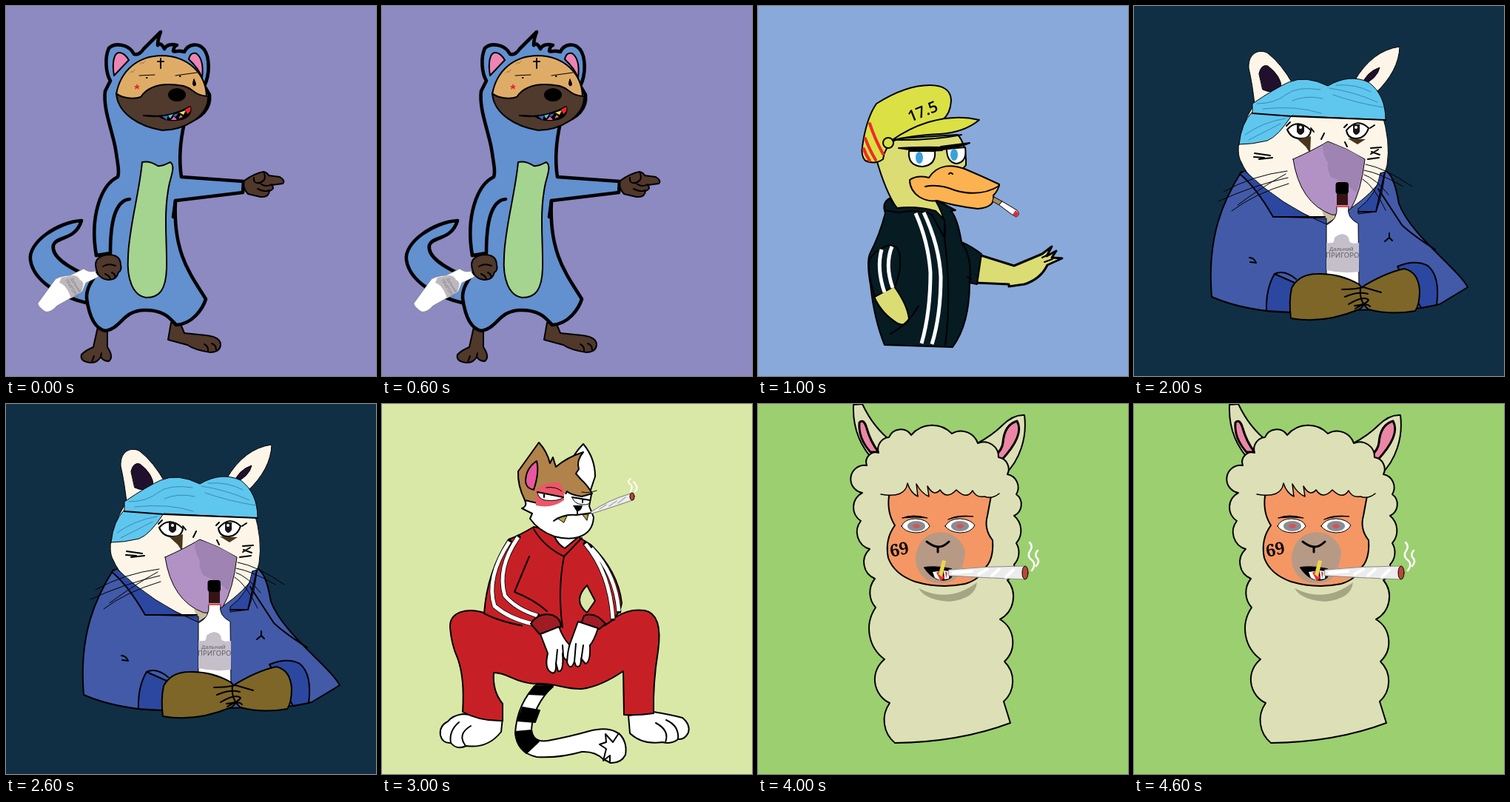
Write an HTML page that moves like this. It is 500 by 500 pixels and loops after 5 s.

```html
<!DOCTYPE html>
<html lang="en">
<head>
<meta charset="utf-8">
<title>Animal portraits</title>
<style>
html, body { margin: 0; width: 100%; height: 100%; overflow: hidden; }
svg { display: block; width: 100vw; height: 100vh; }
svg > g { visibility: hidden; stroke: #000; stroke-width: 2; stroke-linejoin: round; stroke-linecap: round; }
svg > g.on { visibility: visible; }
text { stroke: none; }
.n { stroke: none; }
.l { fill: none; }
.t { stroke-width: 1; }
.b { stroke-width: 4.6; }
.w { fill: none; stroke: #fff; stroke-width: 5; stroke-linecap: butt; }
</style>
</head>
<body>
<svg viewBox="0 0 500 500">

<!-- Weasel -->
<g>
  <path class="n" fill="#8d89c1" d="M0 0H500V500H0Z"/>
  <path class="b" fill="#6390cf" d="M102 290C70 292 30 319 33 343C37 372 73 393 112 402L118 368C80 352 61 338 64 323C68 311 94 317 102 290Z"/>
  <g fill="#50382b">
    <path d="M124 434L137 439V461Q146 474 139 480Q131 480 128 474Q122 485 109 481Q100 479 102 471Q108 465 118 461Z"/>
    <path d="M223 428L236 430L241 442L270 445Q290 447 290 458Q289 468 276 468Q255 465 245 458L219 451Z"/>
    <path class="l" d="M116 481L119 473M128 474L129 469M273 467Q274 460 268 457M284 465Q284 458 278 456"/>
  </g>
  <path class="b" fill="#6390cf" d="M148 193C152 218 153 225 151 231C128 242 113 285 122 337L138 336C128 362 108 372 109 395C113 424 122 437 135 439C156 435 158 411 188 411C215 411 222 423 230 431C252 430 266 409 270 396C251 365 225 335 229 263L320 252L321 237L237 231C233 205 236 180 241 158C265 152 277 138 275 120L268 108C276 92 275 69 268 59C260 49 246 51 241 62C232 59 227 63 226 61Q227 54 231 53Q218 50 214 58Q209 48 205 53Q205 45 209 35L186 58Q180 67 173 65C165 50 146 50 139 57C133 70 135 91 141 101L134 115C131 139 143 166 148 193Z"/>
  <path class="l b" d="M122 337L141 334C141 296 146 263 167 261M229 263L226 285"/>
  <path fill="#ec84b4" d="M146 94C143 76 146 63 153 63Q160 63 166 73ZM247 72Q249 62 257 64Q268 72 265 97Q260 84 247 72Z"/>
  <path fill="#dfac68" d="M149 119C155 86 179 68 209 67C247 67 270 92 271 122L211 150Z"/>
  <path fill="#4f3a2d" d="M149 118C156 125 173 126 182 123C196 102 224 105 240 108C255 112 253 121 273 122C274 151 238 168 211 168C181 163 151 146 149 118Z"/>
  <ellipse cx="231" cy="120" rx="11" ry="8"/>
  <path d="M186 148Q218 153 249 136Q252 148 238 153Q218 157 207 149Z"/>
  <path class="n" fill="#3b64b9" d="M211 149L219 148L217 154ZM226 147L233 145L229 150Z"/>
  <path class="n" fill="#d66baa" d="M223 154L227 149L231 154ZM233 152L236 147L239 150Z"/>
  <path class="n" fill="#62c5dc" d="M219 148L226 146L222 152Z"/>
  <path class="n" fill="#e6df54" d="M234 144L243 141L240 147Z"/>
  <path class="n" fill="#ee2330" d="M242 140L249 136Q251 142 245 146Z"/>
  <path class="l t" d="M180 94L201 93M229 94L258 90"/>
  <path class="l" d="M209 71V84M205 75H213M190 97h.5M235 95h.5"/>
  <path class="t" d="M254 99Q251 106 254 108Q259 108 254 99Z"/>
  <path class="n" fill="#e42932" d="M177 105L178.500 108H181L179 110L180 113L177 111L174 113L175 110L173 108H176Z"/>
  <path class="l" stroke="#a87944" stroke-width="1" d="M167 91L170 88L171 90L174 86M181 79L183 76L185 78L188 74"/>
  <path fill="#a5d490" d="M184 211C194 209 202 214 205 216C212 217 218 213 222 211C228 215 225 225 221 239C212 280 218 318 217 355C216 384 207 394 190 394C171 392 163 368 165 339C166 300 180 254 184 211Z"/>
  <g class="t">
    <path fill="#fff" stroke-width=".6" stroke="#777" d="M67 369Q73 365 87 364L105 355Q113 361 120 358L125 366L108 374L103 386L69 405Q60 415 53 413Q43 406 43 402Z"/>
    <path class="n" fill="#bdb8be" d="M75 367L91 364Q97 364 100 370Q106 373 104 379L102 386L88 395Q82 377 72 374Z"/>
    <g fill="#77727a" font-family="'Noto Sans',sans-serif" transform="translate(86 367) rotate(58)">
      <text font-size="5" x="2" y="0">Дальний</text>
      <text font-size="5.500" x="0" y="7">ПРИГОРОК</text>
    </g>
  </g>
  <g fill="#50382b">
    <path d="M121 350Q121 338 138 336Q155 336 155 350Q157 357 152 360Q149 371 138 370Q123 369 121 350Z"/>
    <path class="l" d="M131 352Q138 347 148 351M134 362Q140 365 141 369M143 360Q149 363 147 368"/>
    <path d="M322 236Q336 226 348 224Q353 225 355 229L370 231Q378 236 374 240L359 242Q364 247 356 250Q355 259 344 258L327 254Q319 246 322 236Z"/>
    <path class="l" d="M349 226Q352 235 345 238Q334 242 335 232M343 239Q350 246 359 241M340 247Q350 252 356 249"/>
  </g>
</g>

<!-- Duck -->
<g>
  <path class="n" fill="#89a9da" d="M0 0H500V500H0Z"/>
  <path fill="#dbdc74" stroke-width="3" d="M298 336L346 351L384 335L397 325L390 338L403 331L397 340L411 341L391 350Q382 369 360 376L339 379V376L294 374Z"/>
  <path class="l" d="M384 340L394 335M387 346L398 342"/>
  <path fill="#061b22" d="M178 260Q167 266 172 280Q164 310 152 333Q146 343 152 377Q157 424 171 458L263 461C282 435 286 400 286 374L296 376L302 335Q287 324 275 319Q270 288 261 277L267 276L240 262Z"/>
  <path class="l" d="M275 319Q290 340 286 374M252 313Q262 392 253 458M283 366L288 369"/>
  <path fill="#dbdc74" d="M160 207Q172 250 188 274Q216 274 234 280L252 313Q257 293 240 263L281 215Q282 188 270 174L175 180Z"/>
  <path fill="#061b22" d="M178 260Q169 264 171 276L190 279Q220 274 235 282L252 313L252 289L240 277Q215 270 188 273Z"/>
  <path class="w" stroke-width="6" d="M213 280Q230 318 233 360Q233 414 221 456M224 279Q245 324 247 366Q247 418 235 457"/>
  <path fill="#dbdc74" d="M157 393L184 379Q202 404 204 423Q199 434 189 429Q167 416 157 393Z"/>
  <path fill="#061b22" d="M158 333Q185 314 191 333Q195 354 186 377L158 393Q147 360 151 342Z"/>
  <path class="w" d="M167 329Q160 355 171 387M181 325Q171 350 182 381"/>
  <path class="l" d="M217 405Q203 430 179 443"/>
  <path fill="#fff" d="M204 196H239Q241 215 222 217Q202 216 204 196Z"/>
  <path fill="#fff" d="M255 193L280 191Q283 211 268 213Q255 211 255 193Z"/>
  <g class="n" fill="#3aa1dc"><ellipse cx="218" cy="205" rx="5" ry="8"/><ellipse cx="265" cy="201" rx="5" ry="8"/></g>
  <path d="M190 192Q220 190 250 191L249 195Q220 197 190 192ZM247 190Q270 187 286 185Q270 192 248 194Z"/>
  <path class="l" d="M180 181Q235 182 275 174"/>
  <path fill="#fcb250" d="M205 235Q215 228 231 232C243 213 263 214 279 220Q305 231 326 241Q325 249 318 256Q321 272 297 274Q264 270 242 263Q230 265 218 258Q205 249 205 235Z"/>
  <path class="l" d="M226 244Q244 240 266 249Q300 259 326 243M258 227Q260 224 263 227"/>
  <path class="t" fill="#a68c62" d="M319 258L330 264L326 269L317 264Z"/>
  <path class="t" fill="#fff" d="M330 264L350 276Q355 282 349 285L342 281L326 269Z"/>
  <path class="n" fill="#e22b35" d="M348 276Q355 282 350 285L344 282Z"/>
  <path fill="#dbe045" d="M141 190C145 161 151 145 160 132C190 113 213 107 232 107C253 107 261 116 261 128Q260 146 249 154L184 182Q170 193 169 207Q158 215 145 209Q139 203 141 190Z"/>
  <path class="l" stroke="#ed2b2d" stroke-width="4" d="M151 159Q158 180 169 200M145 179Q151 195 159 208M143 193Q146 202 151 209"/>
  <path fill="#dbe045" d="M180 182Q204 165 230 157Q267 146 299 154Q278 171 246 173Q205 175 180 182Z"/>
  <circle cx="176" cy="185" r="7" fill="#dbe045"/>
  <text font-family="'Open Sans',sans-serif" font-size="21" font-weight="600" transform="translate(206 157) rotate(-22)">17.5</text>
</g>

<!-- Masked cat -->
<g>
  <path class="n" fill="#112f44" d="M0 0H500V500H0Z"/>
  <path fill="#425aa8" d="M145 224C122 261 98 310 105 393Q151 413 213 414L388 408L413 403L451 380C437 354 374 310 358 267Q351 225 338 222Z"/>
  <g fill="#fdf6e8" class="t">
    <path d="M163 133Q160 105 155 84C154 61 172 58 181 64Q199 78 215 106L200 145ZM298 101Q322 60 359 55Q358 88 326 118Z"/>
    <path d="M165 130C145 157 135 195 145 211C159 245 207 273 260 294Q336 251 342 215Q347 183 335 145Z"/>
  </g>
  <path fill="#21102d" class="t" d="M169 91Q172 78 181 81Q199 95 199 110Q188 120 174 113ZM307 108Q314 89 332 83Q329 98 307 108Z"/>
  <path fill="#5fc6ee" class="t" d="M142 187Q145 158 160 143V132Q191 111 209 103Q232 93 262 108Q291 91 317 103Q340 120 340 154L213 148Q195 176 180 182Q160 187 142 187Z"/>
  <path class="l" d="M160 145L213 149L340 154"/>
  <path class="l" stroke="#347aa0" stroke-width=".8" d="M166 132Q190 132 205 120T252 113M174 139Q220 134 253 145M264 111Q298 116 329 130M269 120Q300 131 337 137M273 107Q300 105 320 116M214 128Q232 120 255 125M150 174Q174 157 204 152M155 181Q179 169 198 159"/>
  <path class="n" fill="#c7bd9d" d="M254 277L275 283L260 294Z"/>
  <path fill="#2c47a0" class="t" d="M143 227L150 223Q199 270 260 295V287L188 285Q166 247 143 227ZM333 226L339 224Q337 253 327 278L303 281V274Q328 256 333 226Z"/>
  <path class="l" d="M143 227Q165 245 188 285H258M339 225L327 278H303M156 340Q162 340 165 347M157 346L165 347M345 307V313L339 318M345 313L349 317M330 247L362 296Q377 310 407 329"/>
  <g fill="#fff">
    <path d="M207 167Q221 151 239 168Q238 180 224 179Q212 179 207 167ZM287 168Q302 150 317 165Q313 178 301 179Q289 180 287 168Z"/>
    <path class="n" fill="#171316" d="M220 160h10v10q-5 8-10 0ZM296 160h9v10q-5 8-9 0Z"/>
    <circle class="n" cx="225" cy="164" r="2"/><circle class="n" cx="300" cy="164" r="2"/>
  </g>
  <path class="n" fill="#4a351c" d="M221 180L239 176L238 199L232 190ZM289 179L313 180L302 187Z"/>
  <path class="l" d="M206 162L211 157M239 165L243 170M284 164L288 160M319 165L325 161M163 199L184 202M169 207L187 205M162 204L176 205M320 192L334 191M321 197L332 201M316 207L331 205M320 200L330 194M253 180L257 172M285 184L288 190"/>
  <g class="t">
    <path fill="#b291c4" d="M215 207Q242 195 262 183Q288 192 312 207Q307 251 293 274Q278 284 267 282Q224 266 215 207Z"/>
    <path class="n" fill="#9f83b2" d="M262 184Q289 192 311 207Q307 236 300 252Q286 239 266 231Q260 218 262 212Q254 198 255 187Z"/>
  </g>
  <path class="l t" d="M207 223Q160 229 121 251M208 232Q162 242 114 264M209 240Q162 254 132 277M205 227Q175 243 140 269M313 214Q340 219 376 244M311 222Q333 226 364 244M311 228Q326 233 344 255M309 234Q325 244 340 276"/>
  <path class="t" fill="#fff" d="M274 271H290Q287 286 303 294L304 382L260 378V296Q276 288 274 271Z"/>
  <path class="n" fill="#361415" d="M274 252H289V269H274Z"/>
  <rect class="n" x="272.500" y="238" width="17.500" height="16" rx="4"/>
  <path class="l" stroke="#e34b49" d="M274 271H290"/>
  <path class="n" fill="#c5bfca" d="M260 320Q270 321 270 318Q270 310 281 308Q291 309 291 318Q294 322 304 320V359Q282 362 260 357Z"/>
  <g fill="#605c64" font-family="'Noto Sans',sans-serif">
    <text x="264" y="331" font-size="7.500">Дальний</text>
    <svg x="260" y="330" width="44" height="15"><text x="-1" y="10" font-size="9.500">ПРИГОРОК</text></svg>
  </g>
  <path fill="#2c47a0" d="M190 362Q178 382 179 412L212 414L217 374ZM356 352Q380 342 397 351Q414 365 409 404L388 408Z"/>
  <path class="l" d="M190 362Q203 356 219 369"/>
  <path fill="#7d6628" d="M213 381Q223 362 248 362Q278 361 304 376Q312 384 308 394Q314 405 304 410Q256 430 212 422Q209 400 213 381Z"/>
  <path fill="#7d6628" d="M306 381Q338 361 365 355Q384 359 386 384Q386 404 380 412Q347 418 317 410Q304 400 306 381Z"/>
  <path class="l" d="M281 383Q299 383 310 380L334 387M285 393Q303 385 316 389M290 403Q310 391 317 397Q314 404 298 405M299 409Q314 400 319 406"/>
</g>

<!-- Tracksuit cat -->
<g stroke-width="1.700">
  <path class="n" fill="#d9e8a6" d="M0 0H500V500H0Z"/>
  <path fill="#fff" d="M209 379Q183 404 180 444Q182 471 209 477Q238 479 270 470Q288 469 299 480L307 484Q324 486 328 470Q331 451 316 443Q303 436 280 442Q256 449 224 455Q204 458 202 440Q204 408 231 381Z"/>
  <path d="M206 381L231 382L219 393L198 392ZM190 410L213 414L207 430L183 428ZM180 443L202 441Q202 453 212 456L195 472Q182 462 180 443Z"/>
  <path fill="#fff" d="M299 482L303 466L294 460L303 457L302 446L312 457L320 445Q332 457 329 474Q323 486 308 485V475Z"/>
  <g fill="#fff">
    <path d="M109 419Q95 421 89 429Q77 435 79 448Q82 459 93 458Q101 468 114 462Q143 466 161 443L163 424Z"/>
    <path class="l" d="M93 458Q90 442 104 430M113 462Q101 446 120 435"/>
    <path d="M333 421L367 416Q391 420 406 424Q417 433 414 444Q409 454 400 453Q392 460 379 457Q352 461 335 445Z"/>
    <path class="l" d="M400 453Q402 435 384 427M383 457Q389 441 370 431"/>
  </g>
  <path fill="#c62026" d="M141 283C111 273 91 283 92 302Q94 326 102 343Q112 370 109 416Q132 429 163 428V405Q149 388 151 363C170 363 178 376 205 378C235 376 245 386 270 385Q295 382 326 361L327 420Q346 421 367 418Q366 377 373 334Q380 284 355 279Q334 276 316 288L230 297Z"/>
  <path fill="#c62026" d="M205 166Q185 178 171 183Q142 227 138 283Q160 295 203 302L290 304Q320 293 324 269Q319 226 282 190L261 177Z"/>
  <path class="n" fill="#c62026" d="M190 290H300V325H190Z"/>
  <path fill="#d9e8a6" d="M277 245L288 266L277 282Q257 266 277 245Z"/>
  <path class="l" d="M199 206L179 254Q205 264 223 280M205 169Q219 193 246 206L270 181M246 206Q237 252 244 302"/>
  <g class="l">
    <path id="stripes" stroke-width="6.600" d="M172 186Q140 235 152 273Q172 290 203 297M184 180Q155 222 166 259Q181 277 210 286M275 189Q308 228 312 290M283 195Q316 230 320 280"/>
    <path class="w" d="M172 186Q140 235 152 273Q172 290 203 297M184 180Q155 222 166 259Q181 277 210 286M275 189Q308 228 312 290M283 195Q316 230 320 280"/>
  </g>
  <path fill="#9f1c24" d="M201 297Q211 281 230 285Q242 290 242 301L213 311ZM273 286Q288 280 302 297L294 304L269 297Z"/>
  <g fill="#fff">
    <path d="M214 311L239 301Q245 317 253 325Q257 336 252 345Q246 348 244 337Q246 363 238 361L235 350Q236 366 229 363Q219 358 224 337Z"/>
    <path d="M265 294L292 303Q286 321 281 326Q282 349 275 351L269 344Q269 358 262 354L260 348Q255 362 250 349Q251 333 254 324Z"/>
    <path class="l" d="M237 332L235 352M244 326L245 340M272 326L269 347M262 324L260 348"/>
  </g>
  <path fill="#fff" d="M193 130Q197 138 189 141L203 148L200 155Q211 171 233 179Q238 190 247 195L265 180Q285 174 286 153L280 138L283 122L239 90Z"/>
  <path class="l" d="M233 179Q252 184 265 180"/>
  <path fill="#fff" d="M253 82Q260 66 272 54Q288 73 288 98L281 119L261 101Z"/>
  <path fill="#b1824a" d="M193 130Q183 110 184 91L212 52Q223 64 227 80L231 72L235 85Q250 72 272 65Q262 77 266 88L262 94L269 102Q278 110 284 121L270 125Q255 123 250 118L245 128L210 134Z"/>
  <path fill="#e9579e" d="M194 105Q194 87 209 77Q213 92 205 116Q195 114 194 105Z"/>
  <path class="n" fill="#ec5668" d="M208 117Q218 105 239 106Q249 118 246 130Q229 142 208 137Z"/>
  <path class="n" fill="#fff" d="M246 121L257 125L259 139L243 146L232 140L246 130Z"/>
  <path class="t" fill="#fff" d="M210 119L245 126Q239 132 220 130Q211 128 210 119ZM257 126L281 130Q282 137 271 136Q259 135 257 126Z"/>
  <path class="l" d="M210 119L245 126M257 126L281 130M219 122V126M271 130V133"/>
  <path class="l t" d="M222 113Q235 111 243 118M270 119Q279 121 290 117"/>
  <path class="n" d="M258 137L271 137Q269 146 263 145Z"/>
  <path fill="#b5a13e" class="t" d="M237 154L250 151L246 160ZM271 149H279L277 157Z"/>
  <path class="l" d="M232 158Q245 148 263 150L284 147M264 143V150"/>
  <path fill="#ececec" class="t" stroke="#777" d="M282 146Q305 130 336 121L341 129Q316 138 284 148Z"/>
  <path class="l" stroke="#aaa" stroke-width="1.500" d="M294 142L303 136M307 138L317 131M319 134L329 126"/>
  <ellipse class="t" cx="338" cy="125" rx="3" ry="5" fill="#b84634"/>
  <path class="l" stroke="#fff" d="M336 118Q340 111 334 107Q331 104 336 101M342 118Q347 113 342 108L340 105"/>
</g>

<!-- Llama -->
<g>
  <path class="n" fill="#9bcf6f" d="M0 0H500V500H0Z"/>
  <path fill="#dde0b6" d="M158 78Q127 46 129 1L141 0Q156 32 181 51ZM295 54Q317 42 330 29Q345 14 360 15C364 45 354 76 333 96Z"/>
  <path fill="#ec86a5" stroke-width="3" d="M152 65Q135 46 137 25Q143 19 147 33Q152 51 163 65ZM321 69Q330 62 331 52Q333 28 350 23Q361 42 328 77Z"/>
  <path id="wool" fill="#dde0b6"/>
  <path class="n" fill="#a6a584" d="M217 249Q258 270 296 241Q294 263 259 267Q226 265 217 249Z"/>
  <path fill="#f49765" d="M177 124Q174 147 185 164Q171 183 176 208Q184 230 212 240Q246 250 280 243Q300 237 305 223Q319 212 317 184Q305 169 310 151L315 124L250 104H203Z"/>
  <path class="n" fill="#dde0b6" d="M166 122V95H324V121Q316 129 306 125Q295 127 290 117Q282 130 268 116Q255 130 246 116Q238 126 229 111L231 125Q221 121 214 108L216 125Q206 120 202 107Q199 128 166 122Z"/>
  <path class="l" stroke-width="1.500" d="M166 122Q199 128 202 107Q206 120 216 125L214 108Q221 121 231 125L229 111Q238 126 246 116Q255 130 268 116Q282 130 290 117Q295 127 306 125Q316 129 326 121"/>
  <path class="t" d="M195 154Q209 148 229 154Q211 152 195 154ZM257 156Q269 149 291 152Q271 151 257 156Z" stroke-width="2"/>
  <g class="t">
    <path fill="#fff" d="M194 165Q198 155 213 155Q229 156 232 165Q227 174 213 174Q198 173 194 165ZM253 165Q258 155 273 155Q288 156 293 164Q288 174 273 174Q258 173 253 165Z"/>
    <g class="n" fill="#8b8b91"><ellipse cx="214" cy="165" rx="12" ry="7"/><ellipse cx="273" cy="165" rx="12" ry="7"/></g>
    <g class="n" fill="#ce5759"><ellipse cx="214" cy="165" rx="5" ry="3"/><ellipse cx="273" cy="165" rx="5" ry="3"/></g>
  </g>
  <path class="n" fill="#b79a85" d="M245 173Q274 174 280 200Q279 222 266 237Q248 247 228 238Q212 226 213 205Q218 176 245 173Z"/>
  <path class="l" stroke-width="3" d="M228 186Q237 193 244 193Q251 193 258 186M243 193V200"/>
  <path d="M225 221Q243 219 261 223Q266 234 255 237Q239 241 225 221Z"/>
  <path class="n" fill="#fff" d="M236 227L244 226L246 238L239 235ZM251 225L259 226L258 236L252 237Z"/>
  <path class="n" fill="#e83039" d="M241 228L245 226L252 235L247 239ZM253 226L256 228L254 236Z"/>
  <path class="n" fill="#ead64c" d="M249 211L254 212L249 234L244 230Z"/>
  <path class="t" fill="#ececec" stroke="#888" d="M258 224Q309 219 359 219Q367 228 360 237Q309 235 258 232Z"/>
  <path class="l" stroke="#fff" stroke-width="4" d="M264 228L289 226M298 230L310 223M316 232L326 223M335 234L345 224"/>
  <ellipse class="t" cx="361" cy="228" rx="4" ry="9" fill="#bb4737"/>
  <path class="l" stroke="#fff" stroke-width="2.500" d="M370 225Q377 216 369 210Q363 205 368 198Q372 192 367 187M376 219Q382 212 376 207Q374 202 378 198"/>
  <text font-family="'Noto Serif',serif" font-weight="900" font-size="23" transform="translate(180 207) rotate(-12)">69</text>
</g>
</svg>
<script>
// Each curl is an arc to the next point: radius, x, y.
const curls = [
  [40, 178, 404], [35, 171, 345], [51, 159, 275], [30, 158, 236], [24, 151, 196],
  [24, 139, 158], [22, 141, 120], [15, 147, 83], [13, 163, 66], [16, 177, 45],
  [17, 207, 42], [37, 262, 40], [24, 297, 53], [20, 325, 72], [16, 337, 95],
  [18, 349, 122], [17, 346, 151], [26, 349, 188], [24, 346, 217], [18, 337, 238],
  [35, 327, 291], [36, 333, 348], [37, 332, 402]
];
document.getElementById("wool").setAttribute("d", "M185 458" +
  curls.map(([r, x, y]) => `A${r} ${r} 0 0 1 ${x} ${y}`).join("") +
  "L341 431Q272 457 185 458Z");

const scenes = document.querySelectorAll("body > svg > g");
const start = performance.now();
function draw() {
  const current = Math.floor((performance.now() - start) / 1000) % scenes.length;
  scenes.forEach((scene, i) => scene.classList.toggle("on", i === current));
  requestAnimationFrame(draw);
}
draw();
</script>
</body>
</html>
```
